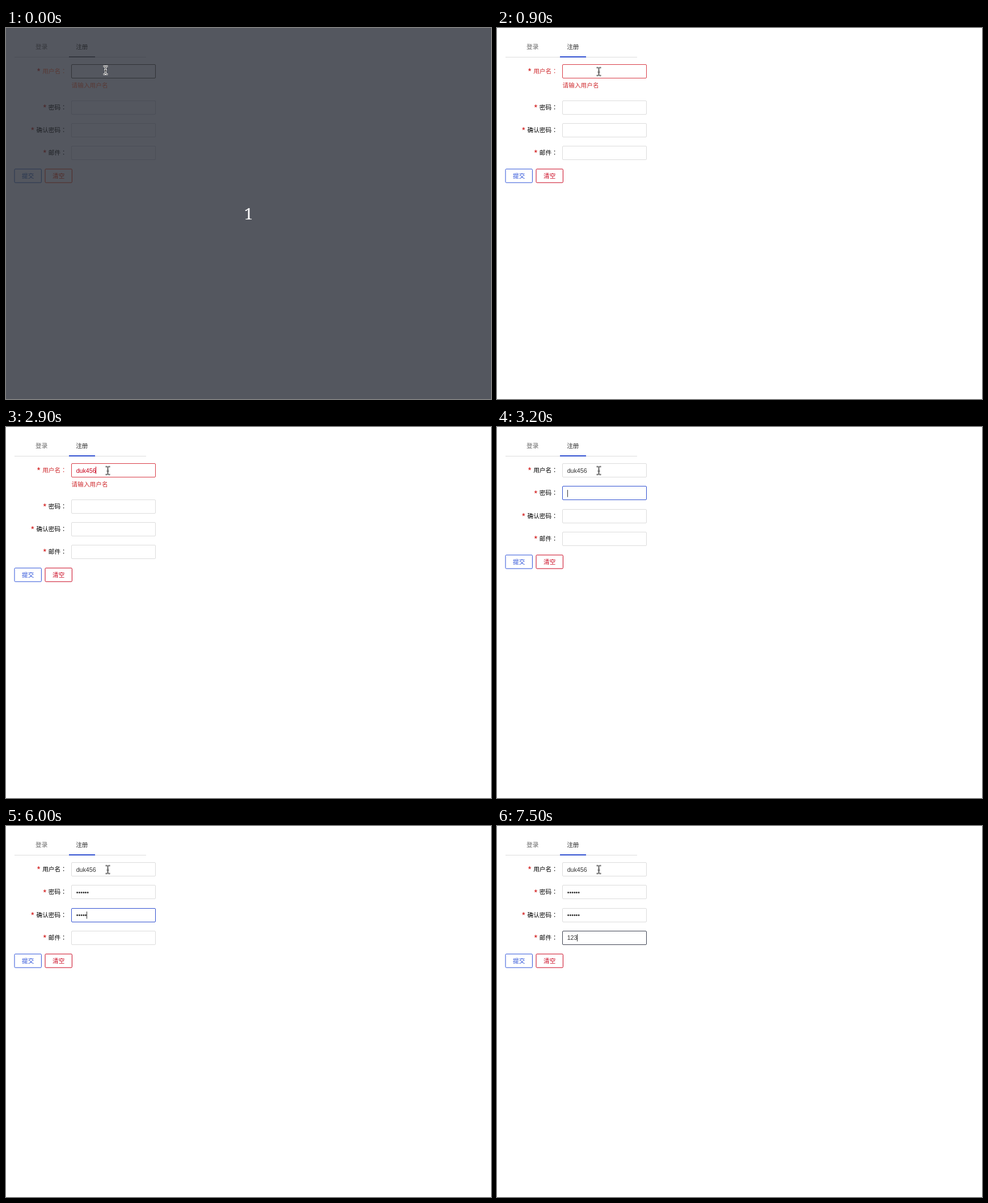
An HTML page that plays this animation: 855 px wide and 655 px high, repeating every 8000 ms.

```html
<!DOCTYPE html>
<html lang="zh-CN">
<head>
<meta charset="utf-8">
<title>注册</title>
<style>
  html, body { margin: 0; width: 100%; height: 100%; overflow: hidden; }
  svg {
    display: block; width: 855px; height: 655px;
    font: 10.67px "Liberation Sans", "Noto Sans CJK SC", "Noto Sans CJK", sans-serif;
    --bg: #fff; --ink: #000; --text: #333; --tab: #666; --on: #2b2b2b;
    --line: #dcdcdc; --focus: #2f4fd0; --blue: #2b50d8; --red: #c9001b;
    --star: #cc0000; --err: #cf2b2f; --errLine: #d83a45; --mail: #3c4150;
    --curIn: #4a4a4a; --curOut: #bbb;
    background: var(--bg);
  }
  svg.dim {
    --bg: #54575f; --ink: #1f2125; --text: #2a2c30; --tab: #35373c; --on: #26282c;
    --line: #4b4e57; --focus: #33363f; --blue: #283650; --red: #522a26;
    --star: #4a2325; --err: #593a36; --errLine: #303236;
    --curIn: #222; --curOut: #fff;
  }
  .box { fill: none; }
  .star { font-size: 14.5px; fill: var(--star); }
  .label, .value { fill: var(--ink); }
  .value { fill: var(--text); }
  .colon { font-family: "Noto Sans CJK JP", "Noto Sans CJK", sans-serif; }
  .mid { text-anchor: middle; }
  #count { display: none; font: 28px "Noto Serif", serif; fill: #fff; }
  .dim #count { display: block; }
</style>
</head>
<body>
<svg id="stage" viewBox="0 0 855 655">
  <text class="mid" x="62.7" y="37.4" fill="var(--tab)">登录</text>
  <text class="mid" x="133.8" y="37.4" fill="var(--on)">注册</text>
  <rect x="15" y="51" width="232" height="1" fill="var(--line)"/>
  <rect x="111" y="50" width="46" height="2" fill="var(--focus)"/>
  <g id="rows"></g>
  <text id="error" x="115.6" y="104.6" fill="var(--err)">请输入用户名</text>
  <g id="buttons">
    <rect class="box" x="15" y="249" width="47.4" height="24" rx="1.5" stroke="var(--blue)"/>
    <text class="mid" x="38.7" y="265" fill="var(--blue)">提交</text>
    <rect class="box" x="69" y="249" width="47.4" height="24" rx="1.5" stroke="var(--red)"/>
    <text class="mid" x="92.7" y="265" fill="var(--red)">清空</text>
  </g>
  <rect id="caret" width="1" height="12.7"/>
  <g id="mouse" fill="none">
    <path d="M-4-7H-1.5L0-5.7 1.5-7H4M-4 7H-1.5L0 5.7 1.5 7H4M0-6V6M-2 0H2" stroke="var(--curOut)" stroke-width="3"/>
    <path d="M-4-7H-1.5L0-5.7 1.5-7H4M-4 7H-1.5L0 5.7 1.5 7H4M0-6V6M-2 1H2" stroke="var(--curIn)"/>
  </g>
  <text id="count" class="mid" x="427.5" y="338">1</text>
</svg>
<script>
const LOOP = 8000;
const LABELS = ["用户名", "密码", "确认密码", "邮件"];
const OPEN = [64, 127.6, 167.8, 208];
const SHUT = [64, 104.2, 144.6, 184.8];
const EM = 10.67;
const USER = "duk456";

const $ = id => document.getElementById(id);
const stage = $("stage"), caret = $("caret"), error = $("error");

function add(parent, tag, cls, attrs = {}, text = "") {
  const el = document.createElementNS("http://www.w3.org/2000/svg", tag);
  el.setAttribute("class", cls);
  for (const k in attrs) el.setAttribute(k, attrs[k]);
  el.textContent = text;
  parent.append(el);
  return el;
}

const rows = LABELS.map(name => {
  const g = add($("rows"), "g", "row");
  const left = 96.2 - name.length * EM;
  return {
    star: add(g, "text", "star", { x: left - 9.4 }, "*"),
    label: add(g, "text", "label", { x: left }, name),
    colon: add(g, "text", "label colon", { x: 96.2 }, "："),
    box: add(g, "rect", "box", { x: 115.5, width: 148, height: 24, rx: 1.5 }),
    value: add(g, "text", "value", { x: 123.7 })
  };
});

// Typed length of each field, as [time, count] steps
const TYPED = [
  [[1500, 3], [2400, 4], [2900, 6]],
  [[4100, 2], [4500, 4], [4700, 6]],
  [[5400, 3], [6000, 5], [6400, 6]],
  [[7300, 2], [7500, 3]]
];
const FULL = [USER, "••••••", "••••••", "123"];
const FOCUS = [0, 3100, 4800, 6400];
const CARET_OFF = [[900, 1400], [2100, 2400], [6900, 7300]];

const last = (steps, t) => steps.reduce((v, s) => t >= s[0] ? s[1] : v, 0);
const mix = (a, b, p) => `color-mix(in srgb, var(--${b}) ${p}%, var(--${a}))`;

function border(i, t) {
  if (i === 0) return t < 3100 ? "var(--errLine)" : t < 3200 ? mix("errLine", "line", 50) : "var(--line)";
  if (i === 1) return t < 3100 || t >= 5100 ? "var(--line)" : t < 3200 ? mix("line", "focus", 50) : "var(--focus)";
  if (i === 2) return t < 4800 ? "var(--line)" : t < 5100 ? mix("line", "focus", 8)
    : t < 6400 ? "var(--focus)" : t < 6700 ? mix("line", "focus", 10) : "var(--line)";
  return t < 6400 ? "var(--line)" : t < 6700 ? mix("line", "mail", 45) : "var(--mail)";
}

function draw(t) {
  const invalid = t < 3100, open = t < 3200;
  const tops = open ? OPEN : SHUT;
  const active = FOCUS.filter(s => t >= s).length - 1;

  stage.classList.toggle("dim", t < 200);
  error.style.display = open ? "" : "none";
  error.style.opacity = invalid ? 1 : 0.5;
  $("buttons").setAttribute("transform", `translate(0 ${open ? 0 : -23})`);
  $("mouse").setAttribute("transform", t < 200 ? "translate(175.5 74.5)" : t < 700 ? "translate(176.5 76)" : "translate(179.5 77)");

  rows.forEach((r, i) => {
    const y = tops[i];
    r.star.setAttribute("y", y + 17.3);
    r.label.setAttribute("y", y + 16);
    r.colon.setAttribute("y", y + 16);
    r.value.setAttribute("y", y + 16.5);
    r.box.setAttribute("y", Math.round(y) + 0.5);
    r.box.style.stroke = border(i, t);
    r.value.textContent = FULL[i].slice(0, last(TYPED[i], t));
  });
  const first = rows[0];
  first.label.style.fill = first.colon.style.fill = invalid ? "var(--err)" : "";
  first.value.style.fill = invalid ? "var(--red)" : "";

  const r = rows[active];
  const end = r.value.textContent ? r.value.getComputedTextLength() : 0;
  const off = t < 200 || CARET_OFF.some(([a, b]) => t >= a && t < b);
  caret.setAttribute("x", Math.floor(124 + end));
  caret.setAttribute("y", Math.round(tops[active] + 6.4));
  caret.style.fill = invalid ? "var(--red)" : "var(--text)";
  caret.style.display = off ? "none" : "";
}

const start = performance.now();
function tick() {
  draw((performance.now() - start) % LOOP);
  requestAnimationFrame(tick);
}
tick();
</script>
</body>
</html>
```
